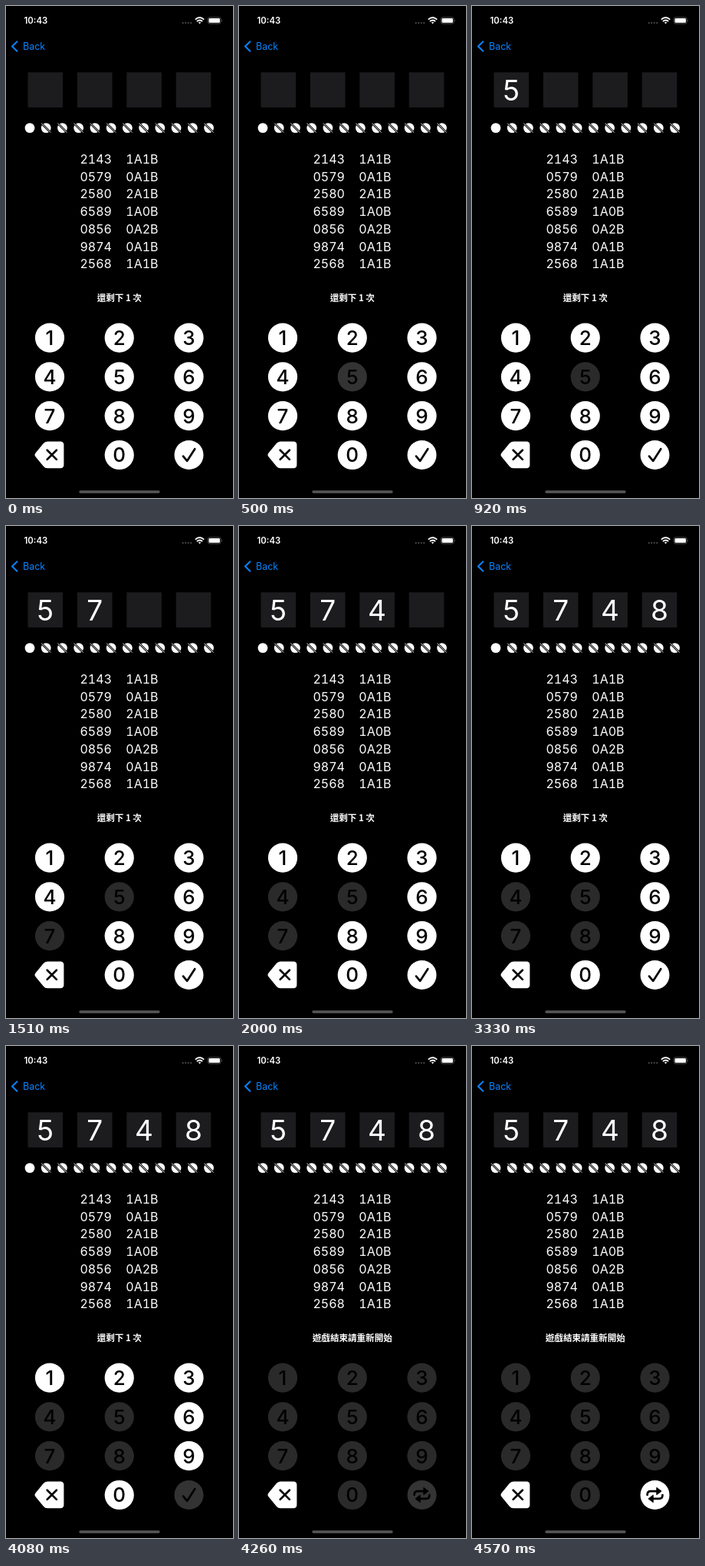
An HTML page that plays this animation: 296x640 px, repeating every 8000 ms.

```html
<!DOCTYPE html>
<html lang="zh-Hant">
<head>
<meta charset="utf-8">
<style>
  html, body { margin: 0; width: 100%; height: 100%; overflow: hidden; background: #000; }
  svg { display: block; width: 296px; height: 640px; }
  text { font-family: Inter, "Liberation Sans", sans-serif; fill: #fff; }
  .log, .slot { font-variant-numeric: tabular-nums; }
  .log { font-size: 16px; }
  .slot { font-size: 37px; text-anchor: middle; }
  .note { font: 700 11.55px "Noto Sans CJK TC", "Noto Sans CJK JP", "Noto Sans CJK", sans-serif; text-anchor: middle; }
  .key { fill: #fff; }
  .key text { font-size: 26px; font-weight: 500; text-anchor: middle; fill: #000; }
  .line { fill: none; stroke: #000; stroke-width: 2.7; stroke-linecap: round; stroke-linejoin: round; }
</style>
</head>
<body>
<svg id="stage" viewBox="0 0 296 640">
  <rect width="296" height="640"/>
  <text x="23.5" y="23" font-size="11.4" font-weight="600">10:43</text>
  <g id="signal" fill="#555"></g>
  <g fill="none" stroke="#fff" stroke-width="1.9">
    <path d="M246.8 17.6Q252.5 12.6 258.2 17.6M248.9 20Q252.5 17 256.1 20"/>
    <path d="M250.8 21.5Q252.5 20.2 254.2 21.5L252.5 23.3Z" fill="#fff" stroke="none"/>
  </g>
  <rect x="263.3" y="14.8" width="16.8" height="8.2" rx="2.4" fill="none" stroke="#666" stroke-width=".8"/>
  <rect x="264.5" y="16" width="14.4" height="5.8" rx="1.4" fill="#fff"/>
  <path d="M281 17.4q1.4 1.5 0 3z" fill="#666"/>
  <path d="M14.4 46.2L8 52.5L14.4 58.8" fill="none" stroke="#0a84ff" stroke-width="2" stroke-linecap="round" stroke-linejoin="round"/>
  <text x="22" y="57" font-size="12.5" style="fill:#0a84ff">Back</text>
  <g id="slots"></g>
  <g id="lives"></g>
  <g id="log"></g>
  <text id="note" class="note" x="147.8" y="384.3"></text>
  <g id="keys"></g>
  <g class="key">
    <path d="M38.3 581.8L48.8 569Q50.8 566.5 54 566.5H71Q75.4 566.5 75.4 571V596.8Q75.4 601.2 71 601.2H54Q50.8 601.2 48.8 598.7L38.3 586Q36.6 583.9 38.3 581.8Z"/>
    <path class="line" d="M53.7 577.7l12.2 12.2m0-12.2l-12.2 12.2"/>
  </g>
  <g class="key">
    <circle id="enter" cx="238.5" cy="584" r="19"/>
    <path id="check" class="line" d="M231 585.6L236.2 591.8L246.2 576.2"/>
    <g id="repeat">
      <path class="line" d="M228.6 584v-.6q0-4.3 4.3-4.3h9M248.4 584v.6q0 4.3-4.3 4.3h-9"/>
      <path d="M240.8 574.4l6.2 4.7l-6.2 4.7zM236.2 584.2l-6.2 4.7l6.2 4.7z" fill="#000" stroke="#000" stroke-linejoin="round"/>
    </g>
  </g>
  <rect x="95.3" y="630.2" width="105.4" height="3.6" rx="1.8" fill="#565656"/>
</svg>
<script>
const LOOP = 8000, END = 4260, ENTER = 4080, FADE = 310;
const LIT = 255, PRESSED = 51, DISABLED = 42;
const guesses = [
  ["2143", "1A1B"], ["0579", "0A1B"], ["2580", "2A1B"], ["6589", "1A0B"],
  ["0856", "0A2B"], ["9874", "0A1B"], ["2568", "1A1B"]
];
const entries = [
  { digit: 5, press: 500, shown: 610 },
  { digit: 7, press: 1200, shown: 1200 },
  { digit: 4, press: 1590, shown: 1660 },
  { digit: 8, press: 2950, shown: 3020 }
];
const el = id => document.getElementById(id);

function add(parent, tag, attrs, text = "") {
  const node = document.createElementNS("http://www.w3.org/2000/svg", tag);
  for (const name in attrs) node.setAttribute(name, attrs[name]);
  node.textContent = text;
  return parent.appendChild(node);
}
const show = (node, on) => node.setAttribute("visibility", on ? "visible" : "hidden");

// Lit until pressed, then fades from the pressed tone to its final tone on release.
function paint(disc, t, press, release, final) {
  const p = Math.min(1, Math.max(0, (t - release) / FADE));
  const v = t < press ? LIT : Math.round(PRESSED + (final - PRESSED) * p);
  disc.setAttribute("fill", `rgb(${v},${v},${v})`);
}

for (let i = 0; i < 4; i++) add(el("signal"), "circle", { cx: 230.7 + i * 3.5, cy: 22, r: 1 });

entries.forEach((entry, i) => {
  const x = 28.5 + i * 64.4;
  add(el("slots"), "rect", { x, y: 86.3, width: 45.6, height: 45.6, fill: "#1c1c1e" });
  entry.node = add(el("slots"), "text", { class: "slot", x: x + 22.8, y: 122.6 }, entry.digit);
});

const slashes = Array.from({ length: 12 }, (_, i) => {
  const g = add(el("lives"), "g", { transform: `translate(${31 + i * 21.23} 158.6)` });
  add(g, "circle", { r: 6.4, fill: "#fff" });
  const slash = add(g, "g", {});
  add(slash, "path", { d: "M-6.5-6.5L6.5 6.5", stroke: "#000", "stroke-width": 2.7 });
  add(slash, "path", { d: "M-5.7-5.7L5.7 5.7", stroke: "#fff", "stroke-width": 0.9, "stroke-linecap": "round" });
  return slash;
});

guesses.forEach(([guess, score], i) => {
  const y = 204.8 + i * 22.75;
  add(el("log"), "text", { class: "log", x: 96.4, y }, guess);
  add(el("log"), "text", { class: "log", x: 156.3, y }, score);
});

const keys = [1, 2, 3, 4, 5, 6, 7, 8, 9, 0].map((digit, i) => {
  const col = digit ? i % 3 : 1, row = digit ? Math.floor(i / 3) : 3;
  const cx = 57 + col * 90.75, cy = 431.6 + row * 50.8;
  const g = add(el("keys"), "g", { class: "key" });
  const disc = add(g, "circle", { cx, cy, r: 19.1 });
  add(g, "text", { x: cx, y: cy + 9.4 }, digit);
  const entry = entries.find(e => e.digit === digit);
  return entry
    ? { disc, press: entry.press, release: entry.shown }
    : { disc, press: END, release: END - FADE };
});

function draw(t) {
  const over = t >= END;
  entries.forEach(e => show(e.node, t >= e.shown));
  keys.forEach(k => paint(k.disc, t, k.press, k.release, DISABLED));
  paint(el("enter"), t, ENTER, END, LIT);
  show(slashes[0], over);
  el("note").textContent = over ? "遊戲結束請重新開始" : "還剩下 1 次";
  show(el("check"), !over);
  show(el("repeat"), over);
}

const start = performance.now();
function tick() {
  draw((performance.now() - start) % LOOP);
  requestAnimationFrame(tick);
}
tick();
</script>
</body>
</html>
```
